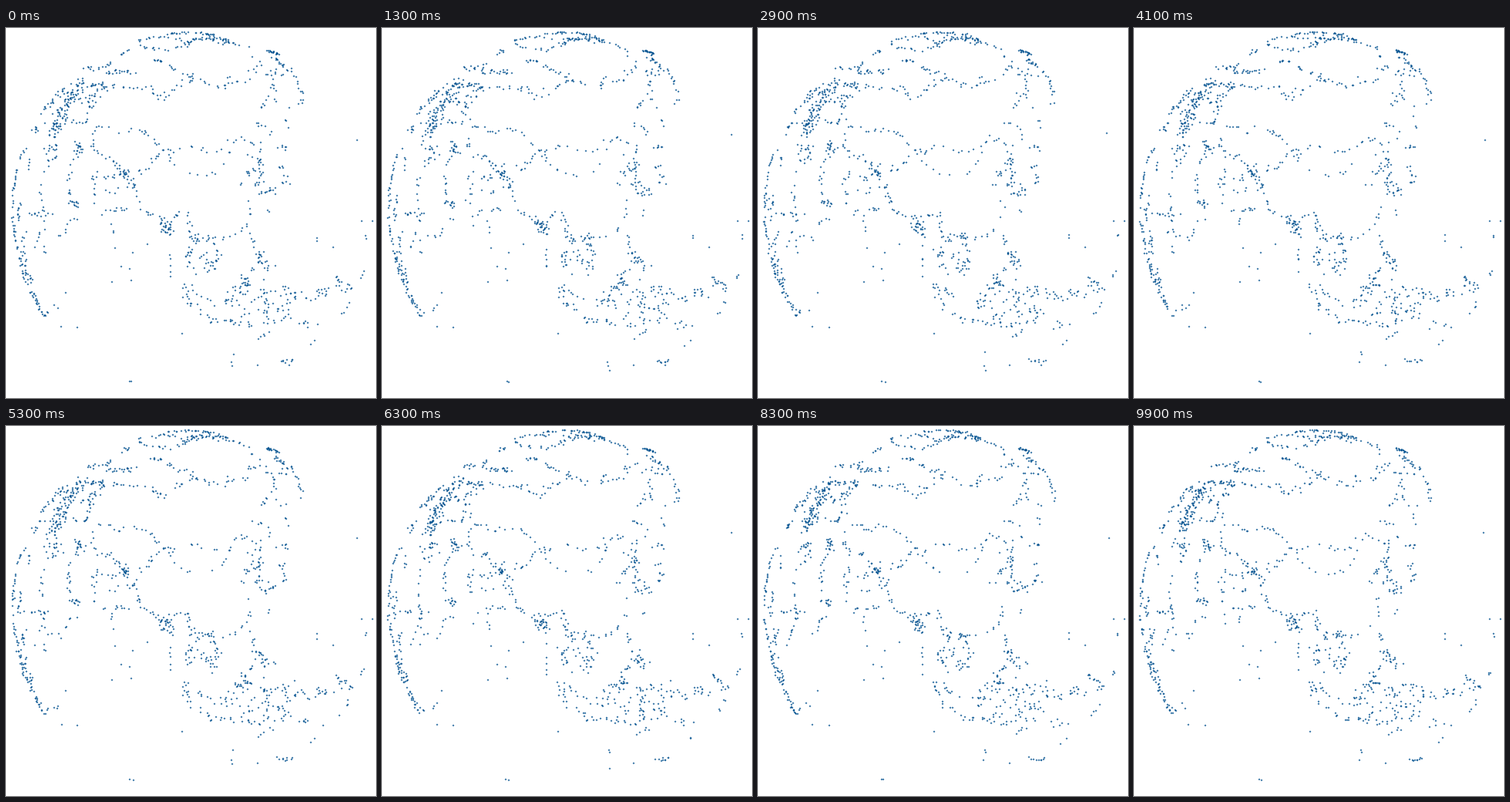
Write a matplotlib script that moves like this. It is 480 px wide and 480 px high and loops after 10000 ms.

```python
import numpy as np
import matplotlib.pyplot as plt
from matplotlib.animation import FuncAnimation

SIZE, DPI = 480, 100
FRAMES, INTERVAL = 100, 100
CENTER, RADIUS = np.array([241.0, 240.0]), 235.0
DENSITY = 0.8
INK = "#00508f"

rng = np.random.default_rng(29)
strokes = []  # (vertex pool, dots shown per frame)


def trace(n, spread, *path):
    """Scatter a pool of vertices along a path; n of them (scaled) show at once."""
    n = max(1, round(DENSITY * n))
    size = n if spread == 0 else round(1.7 * n) + 1
    path = np.array(path, float)
    steps = np.hypot(*np.diff(path, axis=0).T)
    dist = np.concatenate([[0], np.cumsum(steps)])
    at = (np.arange(size) + rng.random(size)) / size * dist[-1]
    pool = np.column_stack([np.interp(at, dist, path[:, k]) for k in (0, 1)])
    pool += rng.normal(0, 0.8 * spread, pool.shape)
    # keep everything on the globe's disc
    off = pool - CENTER
    r = np.hypot(*off.T)[:, None]
    pool = CENTER + off * np.minimum(1, RADIUS / np.maximum(r, 1e-9))
    strokes.append((pool, n))


def islets(*spots):
    for spot in spots:
        trace(1, 0, spot)


# Arctic rim
trace(28, 0.8, (208, 7), (240, 5), (272, 8))
trace(55, 3, (230, 18), (245, 13), (262, 13), (290, 15))
trace(14, 1.2, (172, 14), (205, 11), (225, 14))
trace(18, 1.5, (174, 23), (195, 27), (212, 29), (228, 23), (240, 20))
trace(4, 0.8, (172, 14), (174, 23))
trace(8, 1.8, (148, 34), (160, 28))
trace(14, 1.5, (275, 20), (292, 18), (315, 26), (319, 40))
trace(10, 1.5, (187, 44), (196, 41), (203, 44))
trace(6, 1.5, (210, 50), (219, 53))
trace(10, 2.5, (222, 55), (240, 60), (243, 70))

# Siberian coast
trace(18, 2, (103, 54), (115, 50), (128, 51), (136, 44))
trace(22, 2.5, (130, 58), (150, 56), (168, 57))
trace(22, 2.5, (92, 72), (110, 72), (128, 75))
trace(10, 2, (135, 75), (162, 78), (180, 80))
trace(8, 3, (178, 75), (190, 78), (195, 90))
trace(16, 4, (195, 88), (215, 85), (228, 72), (245, 66))
trace(12, 3, (250, 68), (275, 76), (285, 72), (287, 60))
trace(7, 1.5, (285, 72), (300, 70), (315, 66))
trace(8, 4, (315, 66), (318, 52), (330, 45))

# Bering Sea and Okhotsk
trace(22, 1, (338, 29), (353, 32))
trace(20, 2, (345, 37), (358, 48), (370, 56))
trace(14, 1.5, (370, 56), (380, 70), (384, 85), (383, 96))
trace(12, 4, (330, 50), (340, 56), (352, 57), (365, 57))
trace(10, 2, (347, 65), (348, 80), (350, 97))
trace(8, 3, (330, 103), (340, 95), (337, 85))
trace(3, 1.5, (350, 104), (370, 101), (382, 95))
trace(4, 1.5, (361, 113), (366, 130))
trace(6, 2.5, (320, 122), (342, 130))
trace(3, 1.5, (340, 130), (345, 148))

# Japan, Korea, China
trace(7, 2, (353, 157), (363, 152), (365, 160))
trace(12, 3, (352, 175), (360, 182), (366, 200), (353, 203))
trace(9, 3, (342, 205), (346, 215))
trace(2, 1, (341, 235), (339, 243))
trace(26, 4, (320, 165), (328, 180), (330, 195), (327, 208))
trace(7, 3, (310, 190), (320, 183))
trace(7, 3, (326, 210), (340, 215))
trace(10, 2.5, (290, 150), (302, 140), (318, 150), (328, 150))
trace(8, 2, (330, 150), (327, 178))
trace(3, 1.5, (299, 200), (308, 205))
trace(16, 2, (312, 222), (318, 233), (312, 255), (295, 268),
      (280, 273), (262, 268))

# Mongolia and Kazakhstan
trace(14, 2, (200, 155), (210, 160), (240, 153), (262, 158), (290, 158))
trace(14, 2, (205, 163), (220, 180), (252, 190), (272, 188),
      (285, 170), (293, 152))
trace(8, 3, (193, 163), (215, 160))
trace(22, 2, (112, 130), (128, 128), (145, 137), (160, 128),
      (178, 133), (190, 140), (198, 153))
trace(10, 2.5, (170, 185), (185, 180), (192, 168))
trace(22, 5, (94, 150), (96, 160))
trace(16, 3, (110, 150), (120, 165), (135, 165), (148, 180))
trace(10, 4, (115, 185), (130, 195), (145, 192))
trace(26, 5, (150, 185), (157, 189))
trace(4, 1.5, (112, 150), (112, 135))

# Himalaya and Indochina
trace(12, 3, (165, 195), (170, 215), (172, 230))
trace(10, 2.5, (172, 235), (185, 242), (200, 247))
trace(38, 6, (203, 249), (212, 265))
trace(10, 3, (215, 245), (235, 240), (237, 255))
trace(26, 4, (237, 255), (245, 275), (270, 270))
trace(22, 4, (262, 275), (276, 295), (270, 312), (262, 318))
trace(18, 4, (235, 285), (240, 310))
trace(12, 4, (250, 290), (262, 300), (255, 315))
trace(6, 1, (213, 280), (213, 322))

# Sumatra, Java, Borneo, Sulawesi
trace(14, 4, (225, 330), (237, 350), (240, 362))
trace(10, 4, (238, 330), (250, 350), (262, 355))
trace(6, 3, (250, 365), (265, 378))
trace(22, 3, (265, 378), (300, 381), (330, 384))
trace(34, 5, (280, 362), (300, 340), (318, 330))
trace(10, 5, (300, 360), (315, 372), (320, 350))
trace(24, 6, (330, 340), (340, 355), (335, 375))
trace(6, 3, (335, 383), (355, 380))

# Philippines
trace(6, 2, (318, 265), (322, 285))
trace(26, 5, (320, 293), (330, 300), (340, 310))
trace(12, 2, (322, 310), (310, 320), (308, 338))
trace(5, 2, (310, 320), (315, 335))

# Moluccas and New Guinea
trace(20, 7, (345, 340), (375, 345))
trace(18, 7, (350, 365), (375, 370))
trace(10, 5, (375, 350), (400, 350))
trace(14, 5, (400, 345), (425, 340))
trace(18, 4, (425, 323), (440, 330), (450, 340))
trace(5, 2, (432, 375), (445, 355))
trace(4, 1.5, (458, 325), (463, 316))

# Australia
trace(8, 2.5, (375, 383), (410, 386))
trace(6, 1.5, (326, 404), (340, 393), (352, 391))
trace(2, 1.5, (403, 403), (390, 415))
trace(4, 0.6, (295, 418), (292, 432), (296, 447))
trace(11, 2, (352, 430), (365, 434), (376, 429))

# Ocean islands
trace(2, 0.6, (403, 265), (402, 276))
trace(2, 0.5, (466, 267), (467, 273))
trace(1, 2, (453, 139), (455, 143))
trace(2, 1, (159, 457), (165, 459))
islets((228, 396), (424, 284), (461, 250), (475, 250), (326, 437))

# India and Iran
trace(14, 2, (85, 170), (80, 195), (82, 222))
trace(14, 4, (85, 225), (95, 230))
trace(10, 3, (112, 190), (115, 230))
trace(12, 4, (120, 245), (140, 235), (160, 232))
trace(8, 4, (130, 210), (145, 210), (165, 205))
trace(4, 1.5, (135, 245), (141, 268))
trace(10, 3, (60, 272), (76, 271), (77, 255), (92, 245))
islets((137, 329), (149, 309), (162, 327), (160, 312),
       (164, 291), (141, 285), (183, 280))

# Europe
trace(20, 5, (50, 160), (65, 150), (68, 170))
trace(120, 6, (60, 140), (70, 115), (80, 95), (95, 75))
trace(24, 4, (85, 90), (108, 95), (108, 122))
trace(20, 5, (110, 95), (125, 80), (130, 70))
trace(26, 2.5, (45, 110), (60, 95), (78, 76))
trace(10, 3, (33, 137), (45, 123))
trace(8, 2, (85, 120), (105, 125))

# Africa on the left limb
trace(10, 1, (13, 185), (17, 170), (25, 155))
trace(18, 1, (8, 235), (10, 210), (13, 185))
trace(28, 1.2, (7, 245), (10, 265), (15, 290), (22, 315))
trace(40, 2.5, (22, 315), (32, 340), (48, 372))
trace(12, 2, (18, 215), (15, 250))
trace(5, 1.5, (28, 185), (30, 165))
trace(28, 3, (23, 262), (20, 300), (35, 330))
trace(14, 2.5, (28, 240), (45, 240), (58, 242))
trace(9, 2, (50, 190), (45, 213), (48, 240))
trace(12, 3, (36, 290), (42, 270), (50, 250), (52, 290))
trace(5, 3, (55, 180), (62, 165))
trace(7, 3, (48, 372), (60, 365), (68, 360))
trace(1, 0.6, (70, 387), (72, 388))
islets((92, 388), (77, 343))


fig = plt.figure(figsize=(SIZE / DPI, SIZE / DPI), dpi=DPI, facecolor="white")
ax = fig.add_axes([0, 0, 1, 1])
ax.set(xlim=(0, SIZE), ylim=(SIZE, 0))
ax.axis("off")
dots, = ax.plot([], [], "o", color=INK, markersize=1.45, markeredgewidth=0)


def draw(i):
    """Show a fresh random subset of every stroke's vertices."""
    pick = np.random.default_rng(1000 + i)
    shown = [pool[pick.permutation(len(pool))[:n]] for pool, n in strokes]
    dots.set_data(*np.concatenate(shown).T)
    return dots,


anim = FuncAnimation(fig, draw, frames=FRAMES, interval=INTERVAL,
                     repeat=True, repeat_delay=0, blit=False)
plt.show()
```
